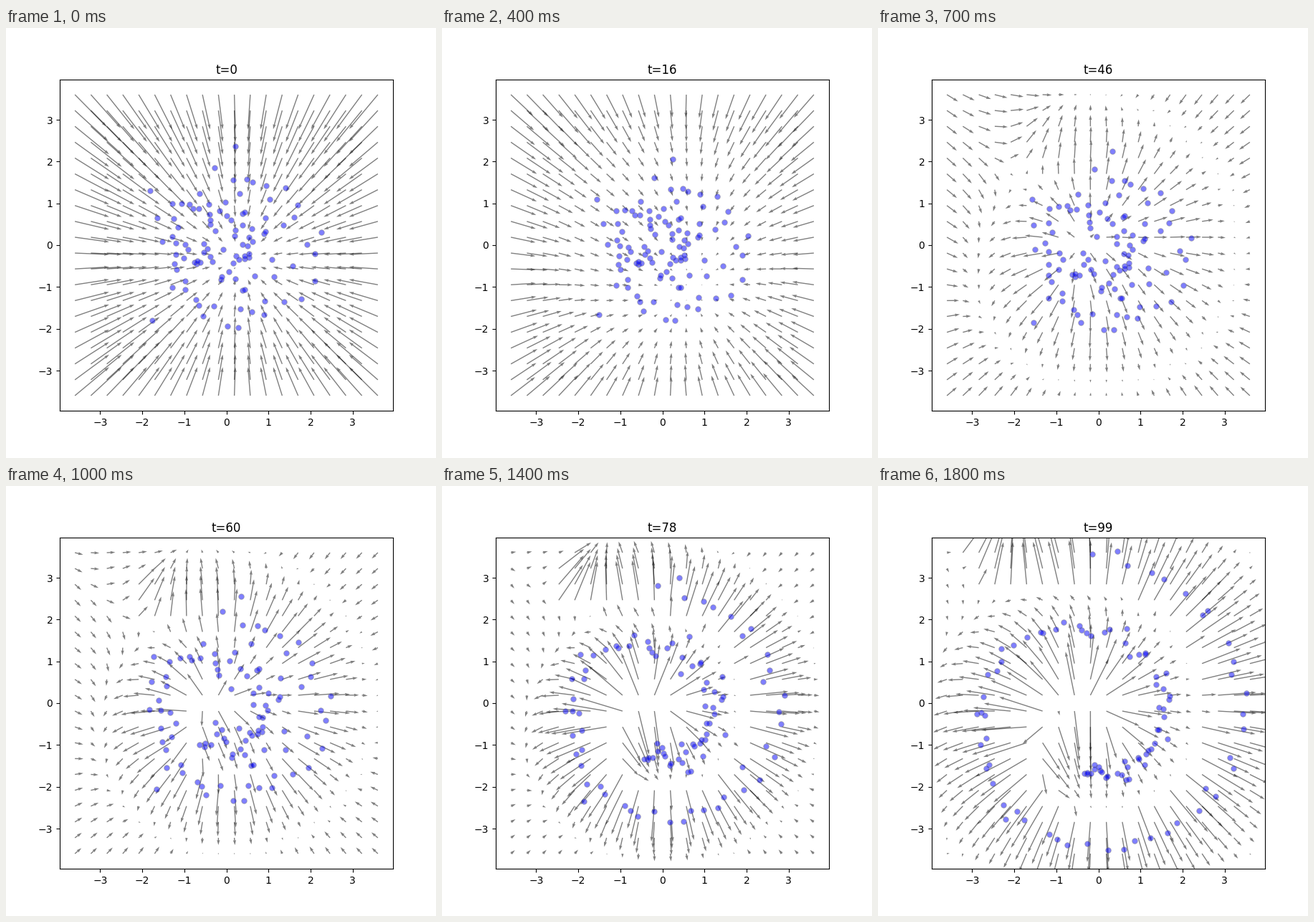
These frames come from a looping animation (600 by 600 pixels, 1.9 s). A matplotlib script:

```python
import numpy as np
import matplotlib.pyplot as plt
from matplotlib.animation import FuncAnimation

FRAMES, INTERVAL = 19, 100
DOTS = 100
SPREAD = 0.18       # thickness of the spiral that the dots flow to
REF_STEP = 90       # step at which the dots are seeded around the spiral


def roll(u):
    """Swiss roll for u from 0 to 1, denser near its inner end."""
    turn = np.pi * (1.5 + 3 * u ** 1.4)
    return np.column_stack([0.287 * turn * np.cos(turn) - 0.22,
                            0.281 * turn * np.sin(turn) - 0.37])


# The roll runs on a little so that the flow stays radial past its outer end.
ROLL = roll(np.linspace(0, 1.02, 300))


def flow(p, t):
    """Velocity at points p and time t, from Gaussian noise to the roll."""
    k = min(t, 0.9)
    var = (1 - k) ** 2 + (k * SPREAD) ** 2
    pull = (k * SPREAD ** 2 - (1 - k)) / var

    radius = np.linalg.norm(p, axis=1, keepdims=True) + 1e-9
    near = p * np.minimum(1, (2 + 2 * t) / radius)
    dist = ((near[:, None] - t * ROLL) ** 2).sum(axis=2)
    weight = np.exp((dist.min(axis=1, keepdims=True) - dist) / (2 * var))
    goal = weight @ ROLL / weight.sum(axis=1, keepdims=True)
    v = goal + pull * (p - t * goal)

    # Limit the speed, most of all where the flow runs inwards late on.
    inward = (v * p).sum(axis=1, keepdims=True) < 0
    cap = np.where(inward, 0.5 + 4.6 * (1 - t) ** 2.5, 5.2)
    speed = np.linalg.norm(v, axis=1, keepdims=True) + 1e-9
    return v * np.minimum(1, cap / speed)


def trace(start):
    """Positions of all dots at steps 0 to 99."""
    path = np.empty((100,) + start.shape)
    path[REF_STEP] = start
    for sign, stop in ((1, 99), (-1, 0)):
        for i in range(REF_STEP, stop, sign):
            h, t = sign * 0.01, i / 100
            middle = path[i] + flow(path[i], t) * h / 2
            path[i + sign] = path[i] + h * flow(middle, t + h / 2)
    return path


rng = np.random.default_rng(4)
jitter = np.clip(rng.normal(0, 0.13, (DOTS, 2)), -0.28, 0.28)
path = trace(REF_STEP / 100 * roll(np.linspace(0, 1, DOTS)) + jitter)

# The steps shown are unevenly spaced over the loop.
steps = np.interp(range(FRAMES), [0, 4, 7, 10, 14, 16, 18],
                  [0, 16, 46, 60, 78, 90, 99]).astype(int)

fig, ax = plt.subplots(figsize=(6, 6), dpi=100)
title = ax.set_title("t=0")

axis = np.linspace(-3.6, 3.6, 20)
grid = np.column_stack([g.ravel() for g in np.meshgrid(axis, axis)])
arrows = ax.quiver(*grid.T, *flow(grid, 0).T, scale=38, width=0.003,
                   color="black", alpha=0.5)
dots = ax.scatter(*path[0].T, s=30, color="blue", alpha=0.5,
                  edgecolors="gray", linewidths=0.7)


def update(frame):
    step = steps[frame]
    arrows.set_UVC(*flow(grid, step / 100).T)
    dots.set_offsets(path[step])
    title.set_text(f"t={step}")
    return arrows, dots, title


anim = FuncAnimation(fig, update, frames=FRAMES, interval=INTERVAL,
                     repeat=True, repeat_delay=0)
plt.show()
```
